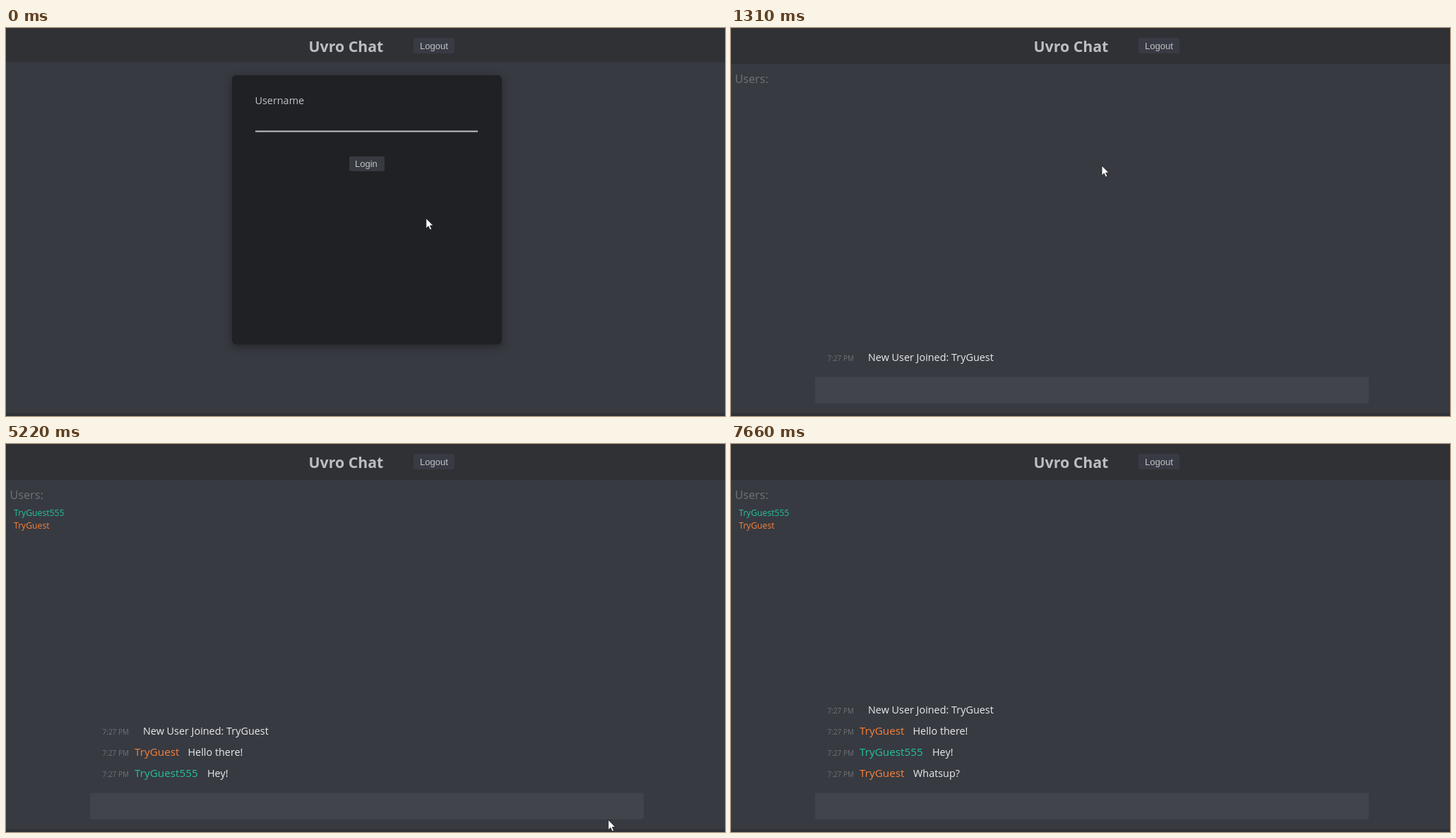
These frames come from a looping animation (1018x550 px, 8000 ms). An HTML page:

```html
<!DOCTYPE html>
<html lang="en">
<head>
<meta charset="utf-8">
<title>Chat demo</title>
<style>
  html, body { margin: 0; width: 100%; height: 100%; overflow: hidden; background: #373a41; }
  svg { display: block; width: 1018px; height: 550px; }
  text { font-family: "Open Sans", "Noto Sans", sans-serif; white-space: pre; fill: #eaebec; }
  .ui { font-family: "Liberation Sans", Arial, sans-serif; font-size: 13px; fill: #c0c2c5; }
  .title { font-size: 21.3px; font-weight: 700; fill: #bcbec0; }
  .label { font-size: 14.4px; fill: #c2c4c6; }
  .field { font-size: 18px; fill: #c8cacc; }
  .dim { font-size: 16.2px; fill: #717377; }
  .user { font-size: 12.2px; }
  .time { font-size: 10px; fill: #707276; }
  .name { font-size: 15.3px; }
  .body { font-size: 14.4px; }
  .entry { font-family: "Liberation Sans", Arial, sans-serif; font-size: 15.5px; }
  .orange { fill: #f9813a; }
  .teal { fill: #26c298; }
  .card { filter: drop-shadow(0 3px 6px rgba(0, 0, 0, .35)); }
</style>
</head>
<body>
<svg viewBox="0 0 1018 550">
  <rect width="1018" height="550" fill="#373a41"/>
  <rect y="546" width="1018" height="4" fill="#303136"/>
  <rect id="header" width="1018" height="48" fill="#303135"/>
  <text class="title" x="428.5" y="34">Uvro Chat</text>
  <rect x="577" y="14" width="58" height="22" rx="3" fill="#383b43"/>
  <text class="ui" x="586" y="29.5">Logout</text>

  <g id="login">
    <rect class="card" x="320" y="67" width="382" height="381.5" rx="6" fill="#202124"/>
    <text class="label" id="label" x="352.5" y="107.5">Username</text>
    <text class="field" id="nameText" x="353" y="133.5"></text>
    <rect id="nameCaret" y="119" width="1" height="18" fill="#c3c5c7"/>
    <rect x="353" y="145.5" width="315" height="2" fill="#c0c1c3"/>
    <rect id="button" x="486" y="182" width="50" height="21" rx="3"/>
    <text class="ui" x="494" y="197">Login</text>
  </g>

  <g id="chat">
    <text class="dim" x="5.5" y="78">Users:</text>
    <g id="users">
      <text class="user teal" x="11" y="102">TryGuest555</text>
      <text class="user orange" x="11" y="120">TryGuest</text>
    </g>
    <g id="rows"></g>
    <rect x="119" y="494.5" width="784" height="37.5" rx="3" fill="#41444b"/>
    <text class="entry" id="entryText" x="128.5" y="518"></text>
    <rect id="entryCaret" y="504" width="1" height="17" fill="#e4e5e6"/>
  </g>

  <g id="cursor">
    <circle id="click" r="10.5" fill="#cbc92f" fill-opacity=".84"/>
    <path id="arrow" d="M0 0V14.2L3.2 11.2L5.6 16.3L7.9 15.2L5.6 10.3H10Z" fill="#fff" stroke="#17181b" stroke-width=".8"/>
    <path id="beam" d="M-2.5 -6.5H-.7L0 -6L.7 -6.5H2.5M0 -6V6M-2.5 6.5H-.7L0 6L.7 6.5H2.5" fill="none" stroke="#c9cacc"/>
    <path id="hand" d="M0 1.5Q1.3 -.3 2.6 1.5V7L8 8.2Q9.3 8.7 9.3 10.3V14L7.8 17V19.5H-.3V17.3L-4.8 11.3Q-5 9.2 -2.8 9.6L0 12Z" fill="#fff" stroke="#202124" stroke-width=".6"/>
  </g>
</svg>
<script>
const LOOP = 8000, CHAT_AT = 1310;
const ROW_STEP = 30, LAST_ROW = 472;
const $ = id => document.getElementById(id);
const show = (id, on) => $(id).setAttribute("visibility", on ? "inherit" : "hidden");
const within = (t, spans) => spans.some(([from, to]) => t >= from && t < to);

const posts = [
  { at: 1310, body: "New User Joined: TryGuest", x: 194 },
  { at: 2970, name: "TryGuest", color: "orange", body: "Hello there!", x: 257.5 },
  { at: 4870, name: "TryGuest555", color: "teal", body: "Hey!", x: 285 },
  { at: 6970, name: "TryGuest", color: "orange", body: "Whatsup?", x: 258 }
];

// Cursor waypoints: time, x, y
const path = [
  [0, 595, 270], [30, 590, 264], [250, 510, 185], [400, 474, 130],
  [1080, 474, 130], [1230, 525, 195], [1330, 525, 195],
  [1500, 441, 429], [1740, 432, 500], [1800, 432, 500], [1860, 430, 490],
  [3199, 430, 490], [3200, 565, 505], [3240, 565, 505],
  [5220, 855, 533], [5400, 450, 478], [5590, 148, 458],
  [5740, 190, 434], [5900, 318, 482], [6040, 308, 506],
  [7209, 308, 506], [7210, 318, 490], [7470, 374, 402]
];
const hiddenSpans = [[3240, 5220], [7470, LOOP]];
const clickSpans = [[440, 560], [1230, 1310], [1740, 1800], [6080, 6160]];
const caretSpans = [[1800, 2060], [2120, 3200], [3470, 3700], [6100, 7210], [7430, 7660]];

function add(parent, cls, x, content) {
  const el = document.createElementNS("http://www.w3.org/2000/svg", "text");
  el.setAttribute("class", cls);
  el.setAttribute("x", x);
  el.textContent = content;
  parent.append(el);
}

for (const post of posts) {
  post.row = document.createElementNS("http://www.w3.org/2000/svg", "g");
  add(post.row, "time", 136.5, "7:27 PM");
  if (post.name) add(post.row, "name " + post.color, 182, post.name);
  add(post.row, "body", post.x, post.body);
  $("rows").append(post.row);
}

const typed = (text, t, start, step) =>
  text.slice(0, Math.max(0, Math.floor((t - start) / step) + 1));

function entryAt(t) {
  if (t < 2970) return typed("Hello there", t, 2120, 58) + (t >= 2860 ? "!" : "");
  if (t < 6970) return typed("Whatsup", t, 6310, 60) + (t >= 6820 ? "?" : "");
  return "";
}

function cursorAt(t) {
  const i = path.findIndex(p => p[0] > t);
  if (i < 0) return path[path.length - 1].slice(1);
  const [t0, x0, y0] = path[i - 1], [t1, x1, y1] = path[i];
  const k = (t - t0) / (t1 - t0);
  return [x0 + (x1 - x0) * k, y0 + (y1 - y0) * k];
}

function cursorKind(x, y, chat) {
  if (chat) return y > 494 && y < 532 && x > 119 && x < 903 ? "beam" : "arrow";
  if (x >= 486 && x <= 536 && y >= 182 && y <= 203) return "hand";
  return x > 353 && x < 668 && y > 115 && y < 147 ? "beam" : "arrow";
}

function setInput(prefix, text, caretOn, originX) {
  const el = $(prefix + "Text");
  if (el.textContent !== text) el.textContent = text;
  const width = text ? el.getComputedTextLength() : 0;
  $(prefix + "Caret").setAttribute("x", Math.round(originX + width));
  show(prefix + "Caret", caretOn);
}

function render(t) {
  const chat = t >= CHAT_AT;
  show("login", !chat);
  show("chat", chat);
  show("users", chat && t >= 1400);
  $("header").setAttribute("height", chat ? 51 : 48);

  $("label").style.fill = t >= 440 ? "#7fb9a9" : "";
  setInput("name", typed("TryGuest", t, 710, 50), !chat && within(t, [[440, 1230]]), 353);
  setInput("entry", entryAt(t), within(t, caretSpans), 129);

  const sent = posts.filter(p => t >= p.at).length;
  posts.forEach((post, i) => {
    post.row.setAttribute("visibility", i < sent ? "inherit" : "hidden");
    post.row.setAttribute("transform", `translate(0 ${LAST_ROW - ROW_STEP * (sent - 1 - i)})`);
  });

  const [x, y] = cursorAt(t), kind = cursorKind(x, y, chat);
  $("cursor").setAttribute("transform", `translate(${x} ${y})`);
  show("cursor", !within(t, hiddenSpans));
  show("click", within(t, clickSpans));
  for (const id of ["arrow", "beam", "hand"]) show(id, id === kind);
  $("button").setAttribute("fill", kind === "hand" ? "#5a5e67" : "#373a40");
}

const start = performance.now();
function frame() {
  render((performance.now() - start) % LOOP);
  requestAnimationFrame(frame);
}
frame();
</script>
</body>
</html>
```
